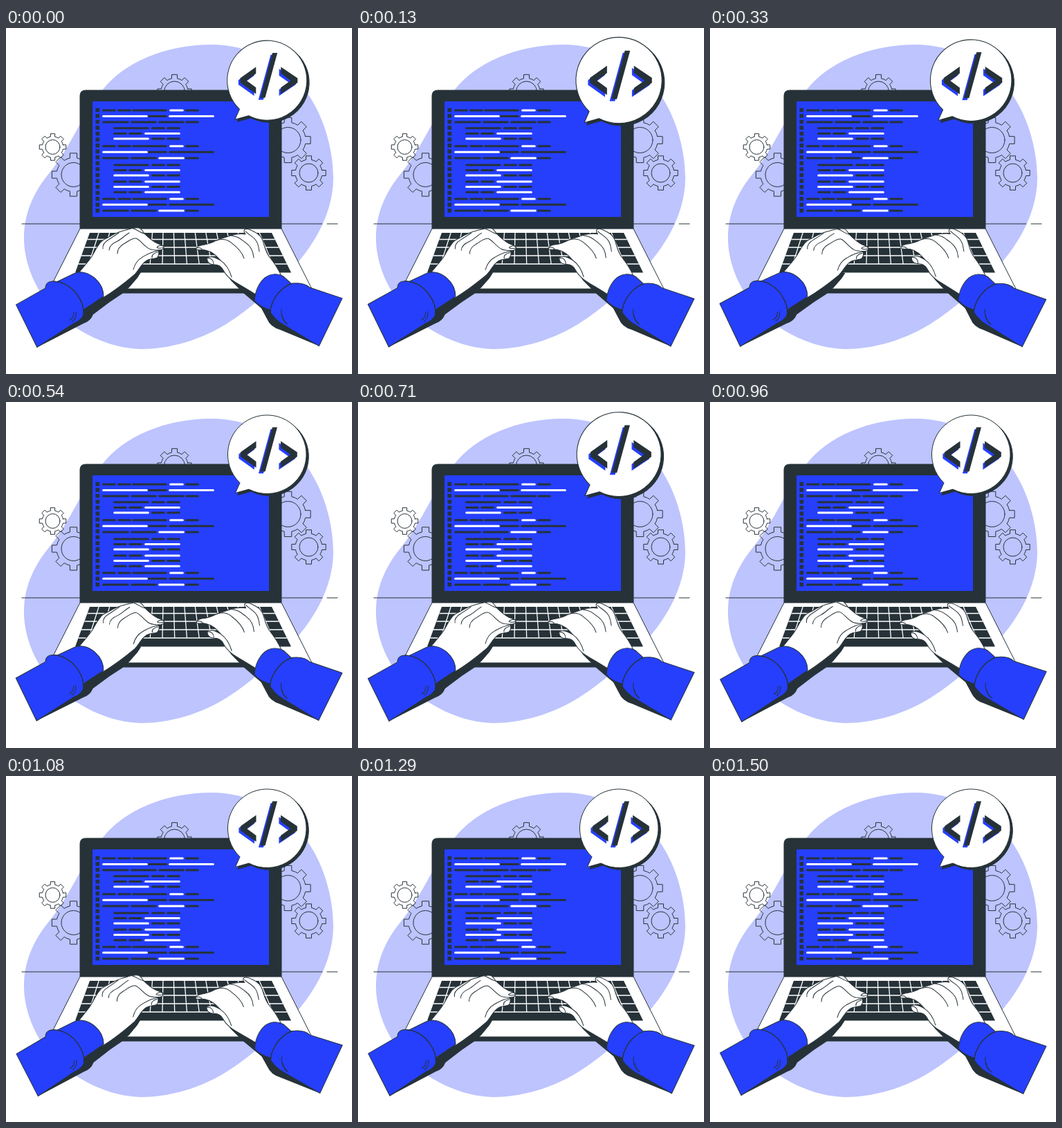
Write an HTML page that moves like this. It is 500 px wide and 500 px high and loops after 1.54 s.

```html
<!DOCTYPE html>
<html lang="en">
<head>
<meta charset="utf-8">
<title>Typing code</title>
<style>
  html, body { margin: 0; width: 100%; height: 100%; overflow: hidden; background: #fff; }
  svg { display: block; width: 100vw; height: 100vh; }
  .ink { fill: #263238; }
  .blue { fill: #253ffc; }
  .line { fill: none; stroke: #263238; stroke-linecap: round; stroke-linejoin: round; }
  .edge { stroke: #263238; stroke-linejoin: round; }
  .skin { fill: #fff; }
</style>
</head>
<body>
<svg viewBox="0 0 500 500">
  <path fill="#bdc4fe" d="M297 24C347 24 400 47 434 92C461 130 473 178 473 218C472 271 443 319 404 358C372 388 352 405 330 420C295 445 245 464 195 464C150 463 100 440 66 404C40 375 25 335 26 300C27 262 44 232 63 209C95 170 108 128 139 90C170 50 230 24 297 24Z"/>
  <g id="gears" class="line"></g>
  <path class="line" d="M23 283H457M464 283H479"/>

  <path class="ink edge" d="M107 290V98Q107 90 115 90H390Q398 90 398 98V290Z"/>
  <path class="blue" d="M125 106H380V273H125Z"/>
  <g id="code"></g>
  <path class="skin edge" d="M107 290H398L442 377H63Z"/>
  <path class="ink" d="M63 377H442V380Q442 383.5 438 383.5H67Q63 383.5 63 380Z"/>
  <path class="ink" d="M121 296H384L412 353.5H100Z"/>
  <path id="keys" fill="none" stroke="#fff" stroke-width="1.3"/>

  <g id="left">
    <path class="ink" d="M45 461.5L112 427Q122 424 126 414L150 396L168 384L178 375L190 361L195 353L186 350L140 384L100 418Z"/>
    <path class="skin edge" d="M100 360C108 350 116 341 122 333C127 326 130 318 135 312C138 307 142 305 147 303C155 298 164 294 173 292C180 290 186 288 192 289C196 290 197 293 200 297C205 302 212 308 218 311C223 313 228 314 228 317C228 320 224 321 220 321C221 324 221 329 218 332C213 334 208 333 203 336C195 341 192 350 186 356C173 367 158 379 140 390Z"/>
    <path class="line" d="M140 319C139 313 143 309 148 306L163 296M149 321C149 315 154 311 161 308C167 305 171 300 178 296M161 326C161 319 165 315 170 312C176 309 181 303 188 304C194 306 199 315 207 319C211 321 216 321 221 321M200 297C194 296 189 291 184 290M220 322C210 323 204 327 197 331C190 335 186 341 184 349M228 315C224 313 219 315 218 317C221 319 225 318 228 317M219 324C214 325 210 328 211 332"/>
    <path class="blue edge" d="M73 367L98 355C108 350 120 354 129 362C138 370 141 378 141 388L111 408Z"/>
    <path class="blue edge" d="M14.5 400L57 376C57 370 61 366 68 366C83 366 97 376 104 387C111 397 113 406 112 415Q108 423 98 427L45 461.5Z"/>
    <path class="line" d="M68 366C83 366 97 376 104 387C111 397 113 406 112 415M92 422C97 420 98 416 98 411M96 424C101 420 102 415 101 410"/>
  </g>

  <g id="right">
    <path class="ink" d="M452.5 459.5L396 436Q382 432 377 420L369 405L343 383L325 365L315 350L340 360L390 402Z"/>
    <path class="skin edge" d="M399 360C394 350 389 341 383 334C377 327 375 321 373 314C371 306 369 301 363 297C358 294 352 290 347 290.5C343 291 343 295 346 298C339 297 331 298 324 300C317 303 310 304 304 307C297 311 290 313 282 314C278 315 274 317 275 320C277 322 282 320 288 321C298 323 304 329 310 336C305 333 299 330 295 331C291 331 290 333 291 336C292 340 296 342 301 342C306 342 311 344 314 350C318 358 325 364 334 369C344 375 353 380 362 386Z"/>
    <path class="line" d="M346 294C351 299 357 301 361 307C365 312 365 318 366 323M325 300C336 301 340 306 346 310C354 316 357 322 358 332M304 307C313 304 319 305 325 310C333 316 341 323 344 333M310 336C319 342 323 350 326 360M275 318C279 317 283 318 284 321M292 333C296 332 300 336 300 341"/>
    <path class="blue edge" d="M359 394C360 382 365 369 374 361C382 355 392 354 401 359L412 369L384 408C373 405 365 401 359 394Z"/>
    <path class="blue edge" d="M486 390.5L439 375C433 369 423 368 414 369C401 373 391 384 386 395C383 401 382 406 382 411Q389 421 398 427L452.5 459.5Z"/>
    <path class="line" d="M382 411C382 406 383 401 386 395C391 384 401 373 414 369M398 406C397 414 399 421 405 427M399 415C400 421 402 424 407 428"/>
  </g>

  <g id="bubble"></g>
</svg>
<script>
const $ = id => document.getElementById(id);
const add = (parent, name, attrs) => {
  const el = document.createElementNS('http://www.w3.org/2000/svg', name);
  for (const key in attrs) el.setAttribute(key, attrs[key]);
  return parent.appendChild(el);
};

// Eight-toothed gear outline with an inner ring
function gear(x, y, r, hole) {
  const root = r * 0.78;
  const at = (rad, a) => `${(x + rad * Math.cos(a)).toFixed(2)} ${(y + rad * Math.sin(a)).toFixed(2)}`;
  let d = '';
  for (let i = 0; i < 8; i++) {
    const a = i * Math.PI / 4;
    d += `${i ? `A${root} ${root} 0 0 1 ` : 'M'}${at(root, a - 0.21)}L${at(r, a - 0.16)}L${at(r, a + 0.16)}L${at(root, a + 0.21)}`;
  }
  add($('gears'), 'path', { d: `${d}A${root} ${root} 0 0 1 ${at(root, -0.21)}Z` });
  add($('gears'), 'circle', { cx: x, cy: y, r: hole });
}
gear(243.5, 92, 25, 15);
gear(67.5, 172, 19.5, 10.5);
gear(97.5, 212, 31.5, 17.5);
gear(407.5, 162, 33, 18.5);
gear(437.5, 209.5, 25, 13.5);

// Code rows: bar start and end, a leading "w" marks a white bar
const rows = {
  a: '139-159 161-181 182-233 w236-257 259-279',
  b: 'w139-205 205-233 w235-301',
  c: '139-178 180-218 220-258 259-279',
  d: '155-207 210-230 232-252',
  e: '155-175 177-197 w200-252',
  f: 'w155-207 210-230 232-252',
  g: 'w139-205 205-233 235-301',
  h: '139-178 180-218 w220-258 259-279'
};
const rowY = [119, 127.5, 136, 144.7, 152.5, 160, 170.7, 179.2, 188, 198, 205.6, 213, 222, 229.5, 237.2, 247, 255.3, 264];
[...'abcdefaghdefefeagh'].forEach((kind, i) => {
  for (const bar of rows[kind].split(' ')) {
    const [x1, x2] = bar.replace('w', '').split('-').map(Number);
    add($('code'), 'path', {
      d: `M${x1 + 1.7} ${rowY[i]}H${x2 - 1.7}`,
      stroke: bar[0] === 'w' ? '#fff' : '#263238',
      'stroke-width': 3, 'stroke-linecap': 'round'
    });
  }
  add($('code'), 'rect', { class: 'ink', x: 129.5, y: 115.7 + 8.55 * i, width: 5.6, height: 5.6 });
});

// Keyboard gaps converge toward the lid
const keyX = (k, y) => {
  const s = (y - 296) / 57.5;
  return 121 - 21 * s + k * (263 + 49 * s) / 17;
};
let gaps = '';
for (const y of [305.5, 317, 329, 341]) gaps += `M${keyX(0, y)} ${y}H${keyX(17, y)}`;
for (let k = 1; k < 17; k++) {
  const end = k > 4 && k < 13 ? 341 : 353.5;
  gaps += `M${keyX(k - 0.15, 296)} 296L${keyX(k - 0.15, end)} ${end}`;
}
$('keys').setAttribute('d', gaps);

const bubble = 'M338 116.8A56.8 56.8 0 1 1 351 126.1L331.5 131.5Z';
add($('bubble'), 'path', { d: bubble, class: 'ink edge', transform: 'translate(3.3 3)' });
add($('bubble'), 'path', { d: bubble, class: 'skin edge' });

const mark = 'M361.5 56.5L339 72.5V79L361.5 95V86L348 76L361.5 66Z' +
  'M385 36.5H392L374.500 100.5H367.5Z' +
  'M397 56.5L420.8 72.5V79L397 95V86L411 76L397 66Z';
add($('bubble'), 'path', { d: mark, class: 'blue', transform: 'translate(-2.6 2.8)' });
add($('bubble'), 'path', { d: mark, class: 'ink' });

const LOOP = 1540, STEPS = 37;
const pulse = [[0, 1], [0.1, 1.1], [0.3, 1], [0.4, 1], [0.5, 1.1], [0.6, 1], [1, 1]];
const sway = [[0, 0], [0.25, 1], [0.75, -1], [1, 0]];

function track(keys, p) {
  const i = keys.findIndex(key => key[0] > p);
  const [p0, v0] = keys[i - 1], [p1, v1] = keys[i];
  return v0 + (v1 - v0) * (p - p0) / (p1 - p0);
}

function draw(t) {
  // 24 steps per second, on a 10 ms grid
  const step = Math.ceil((Math.floor(t / 10) + 0.5) * 6 / 25) - 1;
  const p = (step + 0.5) / STEPS;
  const angle = track(sway, p), scale = track(pulse, p);
  $('left').setAttribute('transform', `rotate(${angle} 121.5 375)`);
  $('right').setAttribute('transform', `rotate(${angle} 380 375)`);
  $('bubble').setAttribute('transform', `translate(379 77) scale(${scale}) translate(-379 -77)`);
}

const start = performance.now();
function tick() {
  draw((performance.now() - start) % LOOP);
  requestAnimationFrame(tick);
}
tick();
</script>
</body>
</html>
```
